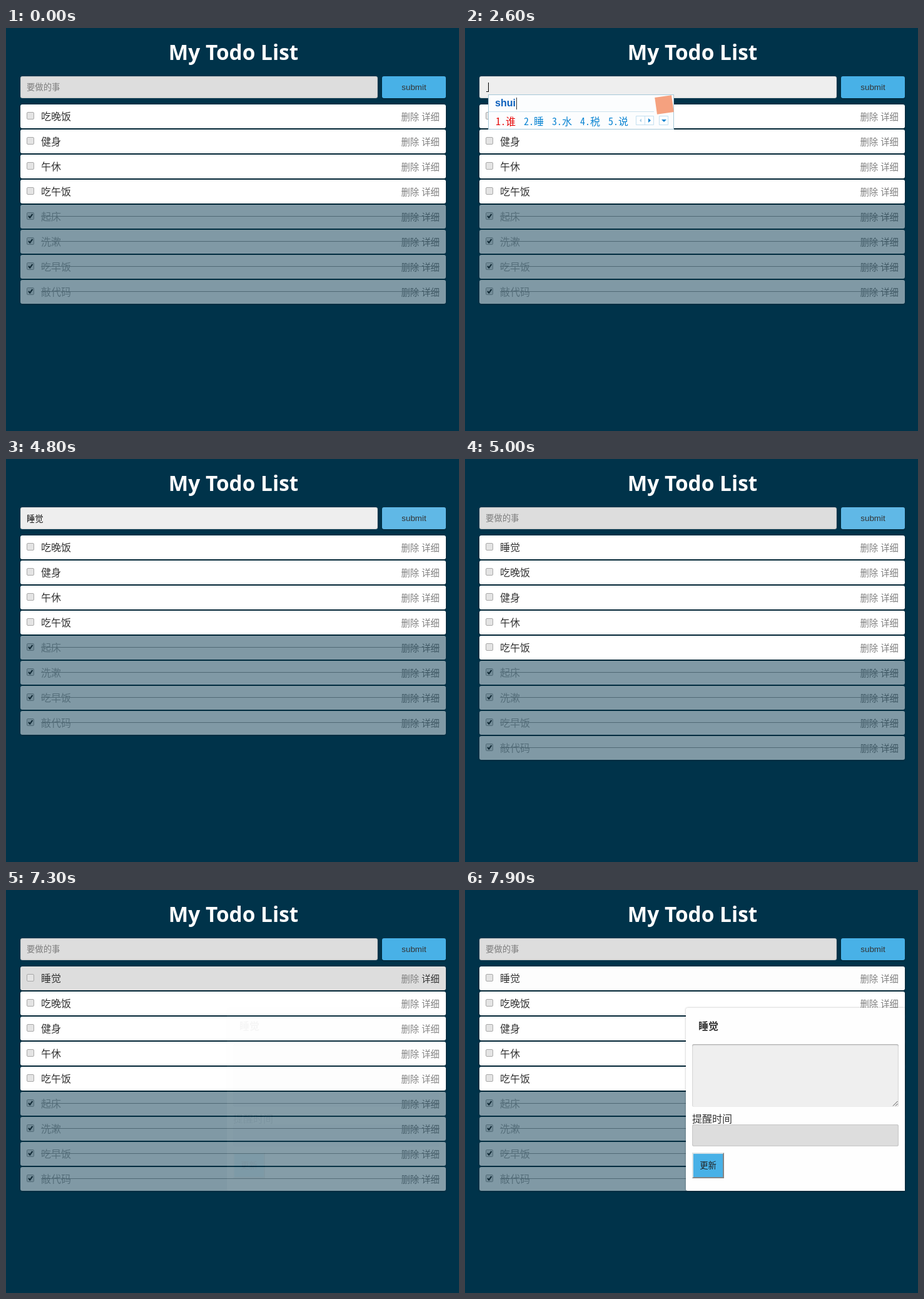
An HTML page that plays this animation: 724x643 px, repeating every 8 s.

```html
<!DOCTYPE html>
<html lang="zh-CN">
<head>
<meta charset="utf-8">
<title>My Todo List</title>
<style>
* { box-sizing: border-box; }
html, body { margin: 0; width: 100%; height: 100%; overflow: hidden; background: #00334a; }
body {
  position: relative;
  color: #333;
  font: 16px/38px "Liberation Sans", "Noto Sans CJK SC", "Noto Sans CJK", sans-serif;
  white-space: nowrap;
}
.abs, .row, .row > *, .ime, .ime > *, .panel > * { position: absolute; }

/* every timed part shares the same eight second clock */
.t { animation: 8s step-end infinite; }

h1 {
  margin: 0; left: 0; top: 18px; width: 727px;
  font: bold 33.4px/40px "Open Sans", "Noto Sans", sans-serif;
  color: #fff; text-align: center;
}

.field { background: #ddd; border-radius: 3px; box-shadow: inset 0 0 2px rgba(0,0,0,.3); }
.small { font-size: 13.333px; line-height: 35px; }
#entry { left: 23px; top: 77px; width: 571px; height: 35px; animation-name: entry; }
#hint { left: 10px; color: #7c7c7c; animation-name: hint; }
#value { left: 10px; top: 1px; color: #111; visibility: hidden; animation-name: value; }
#caret { left: 10px; top: 10px; width: 1px; height: 15px; background: #000; visibility: hidden; animation-name: caret; }
#mark { left: 11px; top: 24px; width: 3px; height: 1px; background: #000; visibility: hidden; animation-name: mark; }
#submit {
  left: 601px; top: 77px; width: 102px; height: 35px;
  background: #48b1e7; border-radius: 3px; text-align: center;
  box-shadow: 0 1px 2px rgba(0,0,0,.4);
  animation-name: submit;
}

.row {
  left: 23px; width: 680px; height: 38px;
  background: #fff; border-radius: 3px;
  box-shadow: 0 1px 3px rgba(0,0,0,.5);
}
.row .box { left: 10px; top: 12px; }
.row .name { left: 33px; top: 1px; }
.row .links { right: 10px; top: 1px; font-size: 14.4px; color: #808080; }
.done { opacity: .5; }
.done .name { color: #aaa; }
.done::after {
  content: ""; position: absolute; left: 33px; right: 10px; top: 18px;
  height: 1px; background: #a0a0a0;
}
#list { left: 0; top: 0; animation-name: shift; }
#fresh { visibility: hidden; animation-name: fresh, shade; }
#fresh .more { animation-name: more; }
#list .row:first-child { animation-name: brush; }

.ime {
  left: 37px; top: 106px; height: 56px;
  background: #fcfdfe; border: 1px solid #a6c8d8;
  visibility: hidden;
}
.ime .typed {
  left: 10px; top: 4px; height: 19px; padding-right: 1px;
  border-right: 1px solid #333;
  font-weight: bold; line-height: 18px; color: #0a5fbc;
}
.ime .rule { left: 0; right: 31px; top: 26px; height: 1px; background: #cde2ee; }
.ime .badge { right: 1px; top: 2px; width: 27px; height: 27px; background: #f5a17f; transform: rotate(-8deg); }
.ime .picks {
  left: 11px; top: 30px; color: #0a84d2;
  font: 16px/22px "Noto Sans Mono CJK SC", "Noto Sans CJK SC", "Noto Sans CJK", monospace;
}
.picks span { margin-right: 13px; }
.picks span:first-child { color: #e60a0a; }
.ime svg { right: 7px; top: 32px; }
#ime0 { animation-name: ime0; }
#ime1 { animation-name: ime1; }
#ime2 { animation-name: ime2; }
#ime3 { animation-name: ime3; }
#ime4 { animation-name: ime4; }
#ime5 { animation-name: ime5; }

.panel {
  left: 353px; top: 188px; width: 350px; height: 292px;
  background: #fefefe; border-radius: 3px 0 0 3px;
  box-shadow: 0 0 3px rgba(0,0,0,.3);
  opacity: 0; animation-name: panel;
}
.panel b { left: 20px; top: 11px; }
#note { left: 10px; top: 58px; width: 330px; height: 100px; box-shadow: inset 0 1px 2px rgba(0,0,0,.35); animation-name: note; }
#note svg { position: absolute; right: 1px; bottom: 1px; }
#label { left: 10px; top: 159px; }
#when { left: 10px; top: 186px; width: 330px; height: 35px; }
#update {
  left: 10px; top: 231px; width: 51px; height: 41px;
  border: 2px solid; border-color: #d8e2e6 #858585 #858585 #d8e2e6;
  background: #48b1e7; color: #222;
  font-size: 13.333px; line-height: 38px; text-align: center;
}

@keyframes entry { 1.25% { background: #eee } 62.5% { background: #ddd } }
@keyframes hint { 25% { visibility: hidden } 62.5% { visibility: visible } }
@keyframes value { 42.5% { visibility: visible } 62.5% { visibility: hidden } }
@keyframes mark { 25% { visibility: visible } 42.5% { visibility: hidden } }
@keyframes caret {
  0% { visibility: hidden; transform: none }
  1.25%, 12.5% { visibility: visible; transform: none }
  6.25%, 18.75% { visibility: hidden; transform: none }
  25% { visibility: visible; transform: translateX(4px) }
  42.5%, 53.75% { visibility: visible; transform: translate(27px, 1px) }
  48.75%, 57.5% { visibility: hidden; transform: translate(27px, 1px) }
}
@keyframes submit {
  57.5% { background: #4fb3e7 } 58.75% { background: #58b5e6 }
  60% { background: #60b8e6 } 80% { background: #48b1e7 }
}
@keyframes shift { 62.5% { transform: translateY(40px) } }
@keyframes fresh { 62.5% { visibility: visible } }
@keyframes shade {
  80% { background: #f8f8f8 } 81.25% { background: #eee } 82.5% { background: #e4e4e4 }
  83.75% { background: #ddd } 95% { background: #e6e6e6 } 96.25% { background: #f0f0f0 }
  97.5% { background: #f8f8f8 } 98.75% { background: #fdfdfd }
}
@keyframes brush { 82.5% { background: #f9f9f9 } 83.75% { background: #fcfcfc } 85% { background: #fff } }
@keyframes more { 85% { color: #555 } 86.25% { color: #333 } 92.5% { color: #555 } 93.75% { color: #808080 } }
@keyframes panel {
  91.25% { opacity: .04 } 92.5% { opacity: .22 } 93.75% { opacity: .475 }
  95% { opacity: .74 } 96.25% { opacity: .93 } 97.5% { opacity: 1 }
}
@keyframes note { 96.25% { background: #e3e3e3 } 97.5% { background: #eaeaea } 98.75% { background: #efefef } }
@keyframes ime0 { 25% { visibility: visible } 27.5% { visibility: hidden } }
@keyframes ime1 { 27.5% { visibility: visible } 30% { visibility: hidden } }
@keyframes ime2 { 30% { visibility: visible } 32.5% { visibility: hidden } }
@keyframes ime3 { 32.5% { visibility: visible } 35% { visibility: hidden } }
@keyframes ime4 { 35% { visibility: visible } 37.5% { visibility: hidden } }
@keyframes ime5 { 37.5% { visibility: visible } 42.5% { visibility: hidden } }
</style>
</head>
<body>
<h1 class="abs">My Todo List</h1>

<div id="entry" class="abs field small t">
  <span id="hint" class="abs t">要做的事</span>
  <span id="value" class="abs t">睡觉</span>
  <i id="mark" class="abs t"></i>
  <i id="caret" class="abs t"></i>
</div>
<div id="submit" class="abs small t">submit</div>

<div id="list" class="abs t"></div>

<div class="abs panel t">
  <b>睡觉</b>
  <div id="note" class="field t">
    <svg width="9" height="9" stroke="#555"><path d="M1 8.5L8.5 1M5 8.5L8.5 5"/></svg>
  </div>
  <span id="label">提醒时间</span>
  <div id="when" class="field"></div>
  <div id="update">更新</div>
</div>

<script>
const add = (el, html) => el.insertAdjacentHTML("beforeend", html);
const list = document.getElementById("list");

const box = done => `<svg class="box" width="12" height="12">
  <rect x=".5" y=".5" width="11" height="11" rx="1.5" fill="#e4e4e4" stroke="#a8a8a8"/>
  ${done ? '<path d="M3 5.8L5.2 8.6L9.4 2.8" fill="none" stroke="#222" stroke-width="2"/>' : ""}</svg>`;

const row = (name, top, done, attrs = "") => `<div class="row t ${done ? "done" : ""}" ${attrs} style="top:${top}px">
  ${box(done)}<span class="name">${name}</span>
  <span class="links">删除 <span class="more t">详细</span></span></div>`;

["吃晚饭", "健身", "午休", "吃午饭", "起床", "洗漱", "吃早饭", "敲代码"]
  .forEach((name, i) => add(list, row(name, 122 + 40 * i, i > 3)));
list.insertAdjacentHTML("beforebegin", row("睡觉", 122, false, 'id="fresh"'));

// typed letters, popup width, candidates
const states = [
  ["s", 307, "是 说 时 上 啥"],
  ["sh", 307, "是 上 时 说 使"],
  ["shu", 345, "书 数 输入 数据 舒服"],
  ["shui", 297, "谁 睡 水 税 说"],
  ["shui'j", 377, "睡觉 水晶 水饺 水解 谁家"],
  ["shui'jue", 497, "睡觉 睡觉的时候 睡觉了 睡觉吧 睡觉时间"]
];
const controls = `<svg width="54" height="17" fill="#fff" stroke="#c3dff0">
  <path d="M1.5 1.5h14v14h-14zM15.5 1.5h14v14h-14zM38.5 1.5h14v14h-14z"/>
  <path d="M10 5.5v6l-3-3z" fill="#a9cfe8" stroke="none"/>
  <path d="M21 5v7l4-3.500z M42 7h8l-4 4z" fill="#1485d0" stroke="none"/></svg>`;

states.forEach(([typed, width, words], i) => add(document.body,
  `<div id="ime${i}" class="ime t" style="width:${width}px">
    <span class="typed">${typed}</span><i class="rule"></i><i class="badge"></i>
    <div class="picks">${words.split(" ").map((w, n) => `<span>${n + 1}.${w}</span>`).join("")}</div>
    ${controls}</div>`));
</script>
</body>
</html>
```
